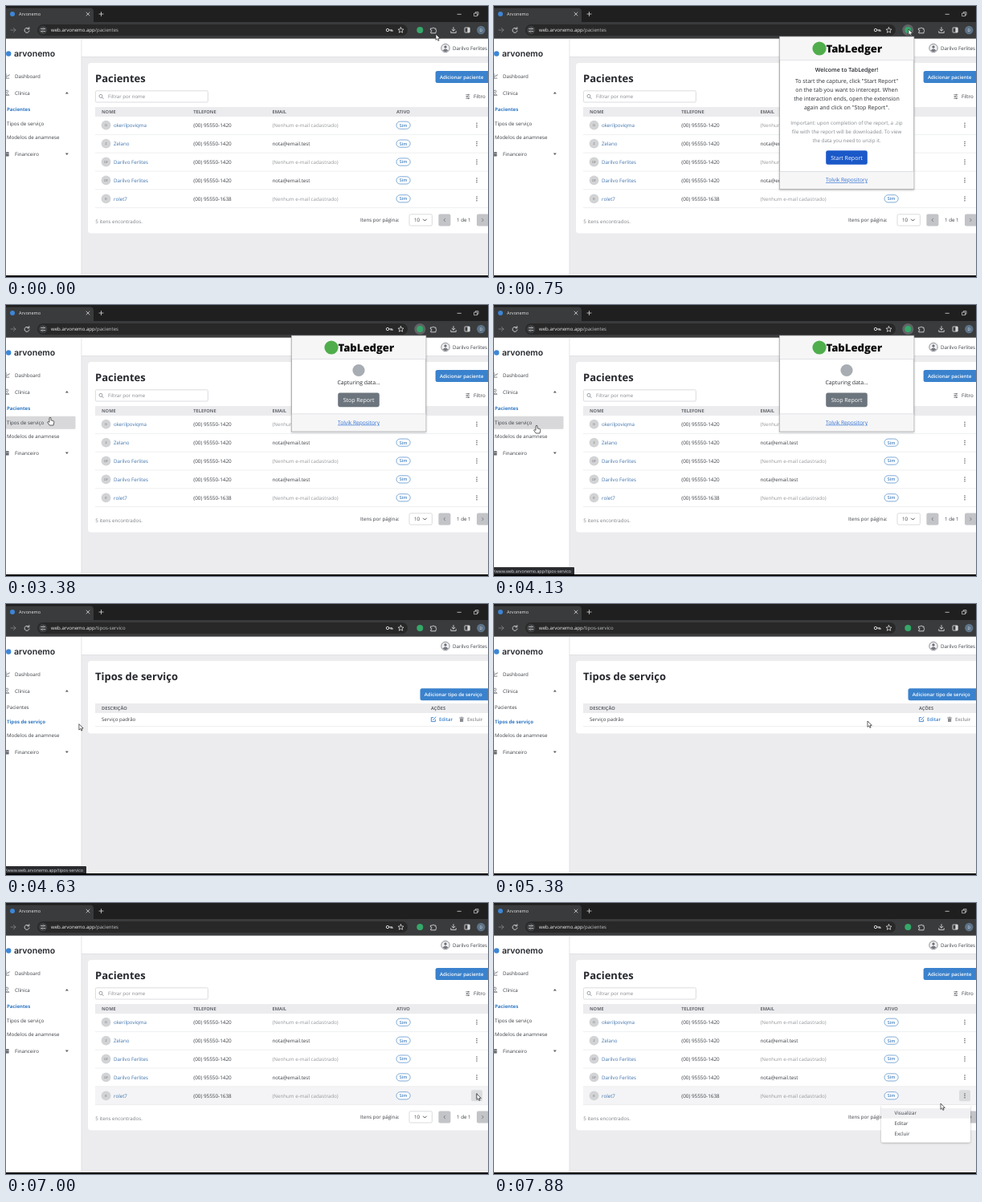
An HTML page for the animation above (8000 ms loop, 600 by 338 pixels).

```html
<!DOCTYPE html>
<html lang="pt-BR">
<head>
<meta charset="utf-8">
<title>Arvonemo</title>
<style>
  html, body { margin: 0; width: 100%; height: 100%; overflow: hidden; background: #000; }
  svg { display: block; width: 100vw; height: 100vh; }
  text { font-family: "Open Sans", "Noto Sans", sans-serif; text-rendering: geometricPrecision; white-space: pre; }
</style>
</head>
<body>
<svg id="stage" viewBox="0 0 600 338" preserveAspectRatio="none"></svg>
<script>
const LOOP = 8000;
const BLUE = '#3a82cd', LINK = '#3f73ab', INK = '#3b3e44', GREY = '#8b8d92', LIGHT = '#e3e4e7';

// Drawing helpers
const rect = (x, y, w, h, fill, r = 0, extra = '') =>
  `<rect x="${x}" y="${y}" width="${w}" height="${h}" rx="${r}" fill="${fill}" ${extra}/>`;
const disc = (x, y, r, fill, extra = '') => `<circle cx="${x}" cy="${y}" r="${r}" fill="${fill}" ${extra}/>`;
const line = (d, color, w = 0.8) =>
  `<path d="${d}" fill="none" stroke="${color}" stroke-width="${w}" stroke-linecap="round" stroke-linejoin="round"/>`;
const group = (id, body, extra = '') => `<g id="${id}" ${extra}>${body}</g>`;
const text = (x, cy, s, { size = 6.2, fill = INK, weight = 400, anchor = 'start', extra = '' } = {}) =>
  `<text x="${x}" y="${cy + size * 0.36}" font-size="${size}" fill="${fill}" font-weight="${weight}" text-anchor="${anchor}" ${extra}>${s}</text>`;
const dots = (x, y) => [-2.4, 0, 2.4].map(d => disc(x, y + d, 0.75, '#55585e')).join('');

function chrome() {
  const pale = '#d6d7d9';
  return rect(0, 0, 600, 21, '#1f1f1f') +
    '<path d="M0 2.5H105Q109 2.5 109 7V20H0Z" fill="#3a3b3c"/>' +
    rect(0, 20, 600, 20.5, '#3a3b3c') +
    disc(8, 10, 3, '#3d86d6') +
    text(16, 10, 'Arvonemo', { size: 5.6, fill: '#e4e5e6' }) +
    line('M100 8l4 4M104 8l-4 4M118.5 7.5v5M116 10h5', pale, 0.8) +
    line('M562 10.3h4.4', pale, 0.8) +
    line('M583 9h3.6v3.6h-3.6zM584.4 9V7.6H588v3.6h-1.4', pale, 0.7) +
    line('M6 30h6M9.4 27.4 12 30l-2.6 2.6', '#85878a', 0.8) +
    line('M28.4 28.4A3 3 0 1 0 29 31M28.8 26.6v2.2h-2.2', pale, 0.9) +
    rect(39, 23, 461, 14, '#282828', 7) +
    disc(46, 30, 5.3, '#3d3e40') +
    line('M43.5 28.4h2M47.8 28.4h.9M43.5 31.6h.7M46.8 31.6h2', pale, 0.8) +
    disc(46.7, 28.4, 0.8, 'none', `stroke="${pale}" stroke-width=".6"`) +
    disc(45.3, 31.6, 0.8, 'none', `stroke="${pale}" stroke-width=".6"`) +
    `<text x="56" y="32.2" font-size="6.05" fill="#f0f0f0">web.arvonemo.app<tspan fill="#c2c3c5" id="path">/pacientes</tspan></text>` +
    disc(475, 30, 1.7, 'none', `stroke="${pale}" stroke-width="1"`) +
    line('M476.8 30h4.2v1.6M479.2 30v1.4', pale, 1) +
    line('M491.5 26.6l1 2.3 2.5.2-1.9 1.6.6 2.5-2.2-1.3-2.2 1.3.6-2.5-1.9-1.6 2.5-.2z', pale, 0.8) +
    group('extGlow', disc(515.3, 30, 7, '#626366')) +
    disc(515.3, 30, 4, '#35a86a') +
    line('M528.8 28h2a1.2 1.2 0 0 1 2.3 0h1.9v2a1.2 1.2 0 0 1 0 2.2v1.6h-6.2v-1.7a1.1 1.1 0 0 0 0-2.2z', pale, 0.9) +
    line('M557 26.6v4.4M555 29.2l2 2 2-2M553.8 31.6v1.8h6.4v-1.8', pale, 0.9) +
    rect(571, 27, 6.2, 6, 'none', 0.6, `stroke="${pale}" stroke-width=".9"`) + rect(574.4, 27, 2.8, 6, pale) +
    disc(591.3, 30, 5.2, '#5d7388') +
    text(591.3, 30, 'D', { size: 4.8, fill: '#e6ebf0', anchor: 'middle' });
}

function shell() {
  return rect(0, 40.5, 600, 295.5, '#ececee') +
    rect(94, 40.5, 506, 23, '#fff') + rect(94, 63.3, 506, 0.7, '#d9dadd') +
    rect(0, 40.5, 94, 295.5, '#fff') + rect(93.6, 40.5, 0.7, 295.5, '#d9dadd') +
    disc(3.2, 59.5, 3.2, '#3d86d6') +
    `<text x="10" y="63" font-size="10.5" font-weight="600" fill="#23262c" style="font-family:Inter,sans-serif">arvonemo</text>` +
    disc(547, 52.5, 5.2, '#f2f2f3', 'stroke="#70737a" stroke-width=".8"') +
    disc(547, 51, 1.7, '#70737a') + '<path d="M543.6 55.6Q547 51.4 550.4 55.6Q547 58.4 543.6 55.6Z" fill="#70737a"/>' +
    text(556, 52.5, 'Darilvo Ferlites');
}

const NAV = [['/pacientes', 129, 'Pacientes'], ['/tipos-servico', 146.5, 'Tipos de serviço'], ['', 163.5, 'Modelos de anamnese']];

function sidebar() {
  const mark = '#686b71';
  return group('navHover', rect(0, -8, 86.5, 16, '#d8d8da', 1)) +
    line('M0 84.5v5.6h3.8M1 88l1.2-1.4 1 .8 1-1.8', mark) + text(11, 87.5, 'Dashboard') +
    disc(1.2, 106.6, 1.5, 'none', `stroke="${mark}" stroke-width=".8"`) + line('M0 111q1.6-3 3.6 0z', mark) +
    text(11, 108.3, 'Clínica') + '<path d="M73.8 109.4h4L75.8 107z" fill="#5a5d63"/>' +
    NAV.map(([path, y, s]) =>
      path ? `<g data-on="${path}">${text(1, y, s, { fill: '#2f78c4', weight: 700, size: 6.05 })}</g>` +
             `<g data-off="${path}">${text(1, y, s)}</g>`
           : text(1, y, s)).join('') +
    rect(0, 182, 3.6, 5.6, mark, 0.6) + line('M.6 184h2.4', '#fff', 0.5) +
    text(11, 185, 'Financeiro') + '<path d="M73.8 183.6h4l-2 2.4z" fill="#5a5d63"/>';
}

const card = (h, title) => rect(102, 71, 506, h, '#fff', 4) +
  text(111, 90.4, title, { size: 13, weight: 700, fill: '#26282d' });
const button = (x, y, label) => rect(x, y, 90, 15, BLUE, 2.5) +
  text(x + 5.3, y + 7.5, label, { size: 6.05, fill: '#fff', weight: 600 });
const heads = (y, cols) => rect(111, y, 489, 12, '#ececee') +
  cols.map(([x, s]) => text(x, y + 6, s, { size: 5.7, weight: 700, fill: '#66696f' })).join('');

const NO_MAIL = '(Nenhum e-mail cadastrado)', MAIL = 'nota@email.test';
const PHONE = '(00) 95550-1420', OTHER = '(00) 95550-1638';
const ROWS = [
  ['O', 'okerilpoviqma', PHONE, NO_MAIL],
  ['Z', 'Zelano', PHONE, MAIL],
  ['DF', 'Darilvo Ferlites', PHONE, NO_MAIL],
  ['DF', 'Darilvo Ferlites', PHONE, MAIL],
  ['R', 'rolet7', OTHER, NO_MAIL]
];
const rowY = i => 148.7 + i * 22.9;

function patients() {
  const rows = ROWS.map(([mono, name, phone, mail], i) => {
    const y = rowY(i);
    return rect(111, y + 11.2, 489, 0.6, LIGHT) +
      disc(124.5, y, 5.9, '#d2d3d5') + text(124.5, y, mono, { size: 3.8, anchor: 'middle', fill: '#6a6c70' }) +
      text(134, y, name, { fill: LINK }) + text(233.3, y, phone, { size: 6.35 }) +
      text(331.5, y, mail, { fill: mail === MAIL ? INK : '#95979b' }) +
      rect(486, y - 4.6, 17.2, 9.2, '#fff', 4.6, 'stroke="#5f96cf" stroke-width=".8"') +
      text(494.6, y, 'Sim', { size: 5.4, weight: 600, fill: '#427fc0', anchor: 'middle' }) +
      (i === 4 ? group('dotGlow', rect(579, y - 7, 14, 14, '#dbdcde', 2)) : '') + dots(586, y);
  }).join('');
  return card(212.5, 'Pacientes') + button(534.6, 81, 'Adicionar paciente') +
    rect(111.4, 105.8, 140, 14.2, '#fff', 1.5, 'stroke="#d2d4d8" stroke-width=".8"') +
    disc(118, 112.4, 2, 'none', 'stroke="#85888e" stroke-width=".8"') + line('M119.6 114l1.6 1.7', '#85888e') +
    text(127, 113, 'Filtrar por nome', { fill: '#85888e', size: 6.1 }) +
    line('M572.8 110.7h4M572.8 113h4M572.8 115.3h4', '#6a6d73') + disc(575.6, 110.7, 0.8, '#6a6d73') + disc(574, 113, 0.8, '#6a6d73') + disc(575.6, 115.3, 0.8, '#6a6d73') +
    text(582, 113, 'Filtro') +
    heads(126, [[119, 'NOME'], [233.3, 'TELEFONE'], [331.5, 'EMAIL'], [486, 'ATIVO']]) +
    group('rowHover', rect(111, 0, 489, 22.4, '#f4f4f6')) + rows +
    text(111.3, 269, '5 itens encontrados.', { fill: '#7d8086' }) +
    text(441, 267, 'Itens por página:') +
    rect(502, 259.8, 28.4, 14.2, '#fff', 1.5, 'stroke="#d2d4d8" stroke-width=".8"') +
    text(508, 267, '10') + line('M519.4 266l2 2 2-2', INK, 0.9) +
    rect(538.4, 259.5, 15, 15, '#c3c4c8', 2) + line('M546.6 265.2l-1.7 1.8 1.7 1.8', '#6f7278') +
    text(561, 267, '1 de 1') +
    rect(586, 259.5, 15, 15, '#c3c4c8', 2) + line('M592.6 265.2l1.7 1.8-1.7 1.8', '#6f7278');
}

function services() {
  return card(90.5, 'Tipos de serviço') + button(515.5, 105.3, 'Adicionar tipo de serviço') +
    heads(124, [[119, 'DESCRIÇÃO'], [529, 'AÇÕES']]) +
    text(119, 144, 'Serviço padrão', { size: 6.1 }) + rect(111, 152, 489, 0.6, LIGHT) +
    line('M532 141.6h-2.6v5h5v-2.4M531.6 144.6l3.4-3.6', BLUE, 0.9) +
    text(539, 144, 'Editar', { fill: BLUE, weight: 600, size: 6 }) +
    line('M564.4 142h5.4M566 142v-.9h2.2v.9', GREY, 0.8) + rect(565, 142.8, 4.2, 4.2, GREY, 0.5) +
    text(574, 144, 'Excluir', { fill: GREY, weight: 600, size: 6 });
}

function menu() {
  return rect(482, 252, 111, 46.4, '#fff', 2, 'filter="url(#shade)"') +
    rect(482, 256, 111, 12.6, '#f0f0f2') +
    ['Visualizar', 'Editar', 'Excluir'].map((s, i) => text(498.5, 262.2 + i * 13, s)).join('');
}

function popup(h, body) {
  const mid = { anchor: 'middle' };
  return rect(355.4, 38.2, 167.4, h, '#fff', 0, 'filter="url(#shade)" stroke="#9b9da1" stroke-width=".8"') +
    rect(355.8, 38.6, 166.6, 28.4, '#f6f6f7') + rect(355.8, 67, 166.6, 0.6, '#cfd1d4') +
    disc(405, 53, 8.6, '#4fae4b') +
    text(413.5, 53, 'TabLedger', { size: 13.1, weight: 800, fill: '#0c0c0d' }) + body +
    rect(355.8, h + 16, 166.6, 21.8, '#f6f6f7') + rect(355.8, h + 16, 166.6, 0.6, '#cfd1d4') +
    text(439, h + 26.6, 'Tolvik Repository', { ...mid, size: 6.6, fill: '#2f6fd0', extra: 'text-decoration="underline"' });
}

const centred = (lines, y, opt) => lines.map((s, i) => text(439, y + i * 11, s, { anchor: 'middle', ...opt })).join('');
const action = (y, label, fill) => rect(413.2, y, 51.6, 17.6, fill, 2.4) +
  text(439, y + 8.8, label, { size: 7, fill: '#fff', anchor: 'middle' });

const welcome = () => popup(190,
  centred(['Welcome to TabLedger!'], 79, { size: 7, weight: 600, fill: '#25282d' }) +
  centred(['To start the capture, click "Start Report"', 'on the tab you want to intercept. When',
    'the interaction ends, open the extension', 'again and click on "Stop Report".'], 93, { size: 7, fill: '#2b2e33' }) +
  centred(['Important: upon completion of the report, a .zip', 'file with the report will be downloaded. To view',
    'the data you need to unzip it.'], 145.3, { size: 6.25, fill: '#85898f' }) +
  action(180.2, 'Start Report', '#1b58c8'));

const capturing = () => popup(119.6,
  group('pulse', disc(0, 0, 7.6, '#6c757d')) +
  centred(['Capturing data...'], 97, { size: 6.9, fill: '#2b2e33' }) + action(109.6, 'Stop Report', '#6c757d'));

const status = (w, path) => rect(-2, 327, w + 2, 10, '#2b2c2f', 1) +
  text(-2.5, 331.6, '//www.web.arvonemo.app' + path, { size: 5.3, fill: '#dcdde0' });

const cursorLook = 'stroke="#222" stroke-width=".7" stroke-linejoin="round" fill="#fff"';
const stage = document.getElementById('stage');
stage.innerHTML =
  '<filter id="shade" x="-10%" y="-10%" width="120%" height="130%"><feDropShadow dx="0" dy="1" stdDeviation="1.3" flood-opacity=".28"/></filter>' +
  shell() + sidebar() + group('patients', patients()) + group('services', services()) + group('menu', menu()) +
  chrome() + group('welcome', welcome()) + group('capturing', capturing()) +
  group('statusA', status(100, '/tipos-servico')) + group('statusB', status(193, '/pacientes')) +
  rect(0, 336, 600, 2, '#000') +
  group('cursor',
    `<path id="arrow" d="M0 0V7.4L1.7 5.8 2.9 8.4 4.1 7.9 3 5.4H5.3Z" ${cursorLook}/>` +
    `<path id="hand" d="M-1 .8Q0-.6 1 .8V3.8L4.2 4.6Q5 4.9 4.8 6.2L4 10H-.8L-3.5 6.2Q-2.9 4.8-1 6.3Z" ${cursorLook}/>`);

// Timeline: visible spans and pointer stops [time, x, y]
const SPANS = {
  welcome: [750, 2105], capturing: [2105, 4380], extGlow: [750, 4380], services: [4380, 5880],
  statusA: [3800, 4850], statusB: [5800, 6500], menu: [7250, LOOP], dotGlow: [6850, LOOP]
};
const STOPS = [
  [0, 535, 35], [130, 535, 35], [500, 516, 29], [1000, 516, 29], [1700, 437, 186], [2700, 437, 186],
  [3300, 55, 140], [3630, 55, 140], [4000, 53, 150], [4500, 53, 150], [5200, 465, 146], [5400, 465, 146],
  [5750, 18, 127], [5900, 18, 127], [6250, 455, 217], [6400, 455, 217], [6900, 586, 238],
  [7350, 586, 238], [7750, 556, 250], [LOOP, 556, 250]
];
const $ = id => document.getElementById(id);
const show = (el, on) => el.style.display = on ? '' : 'none';
const within = (t, id) => t >= SPANS[id][0] && t < SPANS[id][1];

function pointer(t) {
  const i = STOPS.findIndex(s => s[0] > t);
  const [t0, x0, y0] = STOPS[i - 1], [t1, x1, y1] = STOPS[i];
  const k = (t - t0) / (t1 - t0), e = k * k * (3 - 2 * k);
  return [x0 + (x1 - x0) * e, y0 + (y1 - y0) * e];
}

function draw(t) {
  for (const id in SPANS) show($(id), within(t, id));
  const path = within(t, 'services') ? '/tipos-servico' : '/pacientes';
  show($('patients'), path === '/pacientes');
  $('path').textContent = path;
  document.querySelectorAll('[data-on]').forEach(g => show(g, g.dataset.on === path));
  document.querySelectorAll('[data-off]').forEach(g => show(g, g.dataset.off !== path));

  const [x, y] = pointer(t);
  const popupEnd = within(t, 'welcome') ? 228 : within(t, 'capturing') ? 158 : 0;
  const covered = x > 355 && x < 523 && y < popupEnd;
  const nav = x < 86 ? NAV.find(n => Math.abs(y + 1 - n[1]) < 8.5) : null;
  show($('navHover'), nav);
  if (nav) $('navHover').setAttribute('transform', `translate(0 ${nav[1] + 0.3})`);

  const row = within(t, 'menu') ? 4 : Math.floor((y - 137.3) / 22.9);
  const rowOn = x > 111 && !covered && row >= 0 && row < ROWS.length;
  show($('rowHover'), rowOn);
  if (rowOn) $('rowHover').setAttribute('transform', `translate(0 ${rowY(row) - 11.2})`);

  const onButton = within(t, 'welcome') ? y > 180 && y < 198 : within(t, 'capturing') && y > 109 && y < 127;
  const hand = nav || (onButton && x > 413 && x < 465);
  show($('hand'), hand);
  show($('arrow'), !hand);
  $('cursor').setAttribute('transform', `translate(${x} ${y})`);

  // Growing dot: swells in, then fades out
  const p = Math.max(0, t - SPANS.capturing[0]) % 750 / 750;
  $('pulse').setAttribute('transform', `translate(439 81.5) scale(${Math.min(1, p * 2)})`);
  $('pulse').setAttribute('opacity', 1 - Math.abs(p * 2 - 1));
}

function tick() {
  draw(performance.now() % LOOP);
  requestAnimationFrame(tick);
}
tick();
</script>
</body>
</html>
```
